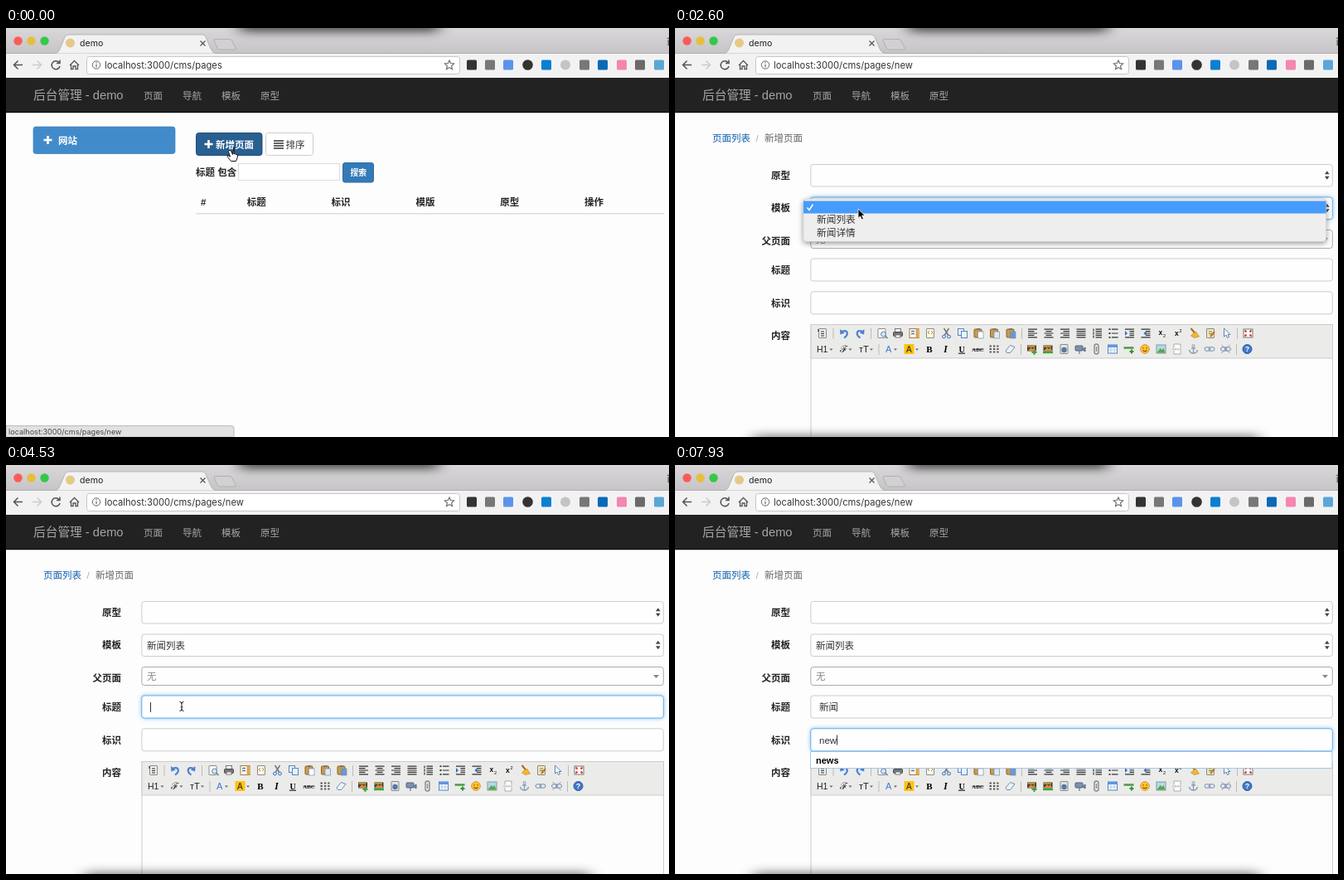
Recreate the animation shown at these times as an HTML page. Size 800 px wide and 493 px high, loop 8 s.

```html
<!DOCTYPE html>
<html lang="zh-CN">
<head>
<meta charset="utf-8">
<title>demo</title>
<style>
html, body { margin: 0; width: 100%; height: 100%; overflow: hidden; background: #fdfdfe; }
svg { display: block; width: 100vw; height: 100vh; }
text { font-family: "Liberation Sans", "Noto Sans CJK SC", "Noto Sans CJK", sans-serif; white-space: pre; }
.ui { font-family: Inter, "Noto Sans CJK SC", sans-serif; }
.bold { font-weight: 700; }
.serif { font-family: "Liberation Serif", serif; }
</style>
</head>
<body>
<svg id="stage" viewBox="0 0 800 493" xmlns="http://www.w3.org/2000/svg"></svg>
<script>
const LOOP = 8000;

// Markup helpers; text is placed by its vertical centre.
const text = (x, cy, str, size = 11.5, fill = '#333', attrs = '') =>
  `<text x="${x}" y="${cy + size * .37}" font-size="${size}" fill="${fill}" ${attrs}>${str}</text>`;
const bold = (x, cy, str, size = 11.5, fill = '#222', attrs = '') =>
  text(x, cy, str, size, fill, `class="bold" ${attrs}`);
const rect = (x, y, w, h, fill, stroke = 'none', r = 0, attrs = '') =>
  `<rect x="${x}" y="${y}" width="${w}" height="${h}" rx="${r}" fill="${fill}" stroke="${stroke}" ${attrs}/>`;
const dot = (x, y, r, fill, stroke = 'none') =>
  `<circle cx="${x}" cy="${y}" r="${r}" fill="${fill}" stroke="${stroke}"/>`;
const path = (d, fill = 'none', stroke = 'none', w = 1, attrs = '') =>
  `<path d="${d}" fill="${fill}" stroke="${stroke}" stroke-width="${w}" ${attrs}/>`;
const group = (id, body, attrs = '') => `<g id="${id}" ${attrs}>${body}</g>`;
const at = (x, y, body) => `<g transform="translate(${x} ${y})">${body}</g>`;
const plus = (x, y) => path(`M${x - 5} ${y}h10M${x} ${y - 5}v10`, 'none', '#fff', 2.6);

const defs = `<defs>
  <linearGradient id="strip" x2="0" y2="1"><stop stop-color="#d9d7d9"/><stop offset="1" stop-color="#c6c4c6"/></linearGradient>
  <linearGradient id="pop" x2="0" y2="1"><stop stop-color="#f3f3f3"/><stop offset="1" stop-color="#cacaca"/></linearGradient>
  <filter id="blur" x="-20%" y="-200%" width="140%" height="500%"><feGaussianBlur stdDeviation="9 6"/></filter>
  <filter id="soft" x="-5%" y="-30%" width="110%" height="170%"><feDropShadow dx="0" dy="2" stdDeviation="3" flood-opacity=".4"/></filter>
  <filter id="glow" x="-5%" y="-40%" width="110%" height="180%"><feDropShadow dx="0" dy="0" stdDeviation="2.5" flood-color="#66afe9" flood-opacity=".75"/></filter>
</defs>`;

function browser() {
  const lights = ['#fc5b57', '#e5bf3c', '#34c84a'].map((c, i) => dot(14.5 + i * 16, 15.5, 5.2, c)).join('');
  const square = (x, c) => rect(x - 6, 38.5, 12, 12, c, 'none', 1.5);
  const extensions = square(562, '#333') + square(584, '#777') + square(606, '#5b93ea') + dot(629.5, 44.5, 6.3, '#333') +
    square(652, '#0a7fd0') + dot(675, 44.5, 6, '#c4c4c4') + square(698, '#777') +
    group('idle', dot(720, 44.5, 5, '#d6d6d6')) + group('ready', square(720, '#0b69b5')) +
    square(743, '#f486b0') + square(765, '#6a6a6a') + square(788, '#5aa7d6');
  return rect(0, 0, 800, 31, 'url(#strip)') +
    rect(282, -10, 240, 14, '#000', 'none', 0, 'filter="url(#blur)" opacity=".72"') +
    path('M0 30.5H800', 'none', '#b0aeb0') +
    path('M58 31C64 30 64 27 66 23L71 11Q72 8 76 8H237Q240 8 241 11L247 25Q249 30 254 31Z', '#f3f2f3', '#aaa', .8) +
    path('M251 15Q251 13.5 253 13.5H270Q272 13.5 273 16L277 24Q278 26 276 26H259Q256 26 255 24Z', '#d2d0d2', '#aaa', .8) +
    lights + dot(77.5, 18, 5.5, '#e5c988') + text(89, 18.5, 'demo', 10.6, '#222', 'class="ui"') +
    path('M234.5 15.5l6 6m0-6l-6 6', 'none', '#555', 1.2) + text(797, 16, '首', 10, '#333') +
    rect(0, 31, 800, 29, '#f3f2f3') +
    path('M20 44.5H10M14.5 39.5l-5 5 5 5', 'none', '#555', 1.5) +
    path('M32 44.5H42M37.5 39.5l5 5-5 5', 'none', '#ccc', 1.5) +
    path('M64 41.5A5 5 0 1 0 65 46M65 38.5V42.5H61', 'none', '#555', 1.5) +
    path('M77 45L82.5 39.5 88 45M78.5 44V49.5H81V46H84V49.5H86.5V44', 'none', '#555', 1.3) +
    rect(97.5, 34.5, 450, 21, '#fff', '#c8c7c8', 3) +
    dot(109, 44.5, 4.7, 'none', '#666') + path('M109 43.7V47.2M109 41.3V42.5', 'none', '#666', 1.2) +
    `<text id="url" class="ui" x="119" y="48.6" font-size="11.2" fill="#333"></text>` +
    path('M535 39l1.6 3.6 4 .4-3 2.7.9 3.9-3.5-2-3.5 2 .9-3.9-3-2.7 4-.4Z', 'none', '#666', 1.1) + extensions;
}

const navbar = rect(0, 60, 800, 42, '#222') + rect(0, 101, 800, 1.2, '#080808') +
  text(33, 81, '后台管理 - demo', 14.7, '#a6a6a6') +
  ['页面', '导航', '模板', '原型'].map((s, i) => text(166 + i * 47, 81.5, s, 11.5, '#a6a6a6')).join('');

const listPage = rect(33, 119, 171, 32.5, '#428bca', '#3b80bd', 3, 'stroke-width=".7"') + plus(50.5, 135) + bold(63, 135.5, '网站', 11.5, '#fff') +
  rect(229.5, 126.5, 79.5, 27, '#286090', '#204d74', 3) + plus(244.5, 140) + bold(253, 140.5, '新增页面', 11.5, '#fff') +
  rect(313.5, 126.5, 57, 27, '#fff', '#ccc', 3) + path('M323 136h12m-12 3h12m-12 3h12m-12 3h12', 'none', '#333', 1.7) + text(337.5, 140.5, '排序') +
  bold(229, 173.5, '标题 包含') + rect(280.5, 163.5, 122, 20, '#fff', '#ddd') +
  rect(406.5, 162.5, 37, 23.5, '#337ab7', '#2e6da4', 2.5) + bold(415.5, 174, '搜索', 9.8, '#fff') +
  ['#', '标题', '标识', '模版', '原型', '操作'].map((s, i) => bold(i ? 189 + i * 101.8 : 235, 209.5, s)).join('') +
  rect(229, 223, 565, 1.5, '#ddd') +
  group('status', path('M0 479.5H272Q275 479.5 275 482V493H0Z', '#e2e1e2', '#bbb') +
    text(3, 486.5, 'localhost:3000/cms/pages/new', 9.1, '#444', 'class="ui"'));

// Editor toolbar icons, drawn around their own centre.
const sheet = (c = '#fff') => rect(-4.5, -5.5, 9, 11, c, '#8a8a8a', .5);
const board = (c) => rect(-5.5, -5, 9, 10, '#c89a4c', '#8a6528', 1) + rect(-2.5, -6, 4, 2, '#777') + rect(-1, -2, 6.5, 8, c, '#7c8ca8', 0, 'stroke-width=".7"');
const rows = (starts) => path(starts.map((s, i) => `M${s[0]} ${i * 2.4 - 4.8}H${s[1]}`).join(''), 'none', '#333', 1.2);
const full = [-5.5, 5.5], mid = [-3.5, 3.5], left = [-5.5, 2], right = [-2, 5.5], item = [-2, 5.5];
const bend = (s) => path(`M${-s * 3}-2Q${s * 4}-5 ${s * 3.8} 1Q${s * 3} 4 0 5.5`, 'none', '#4a7fd2', 2.2) +
  path(`M${-s * 5}-5L${-s * 4.6} 1.5 ${s * .8}-.5Z`, '#4a7fd2');
const glyph = (s, size, fill = '#111', attrs = '') => text(0, 0, s, size, fill, `text-anchor="middle" ${attrs}`);
const shift = (s) => rows([full, [0, 5.5], [0, 5.5], [0, 5.5], full]) + path(`M${-2.5 - 3 * s} -3l${3 * s} 3 ${-3 * s} 3Z`, '#2f6fc4');
const picture = rect(-5.5, -4.5, 11, 7, '#3e3e30') + path('M-5 2L-1-2 1 0 3-2 5 2Z', '#e8843a') + path('M-5-3h9', 'none', '#e8c43a', 1.3);
const chain = rect(-6, -2.2, 7, 4.4, 'none', '#7189ac', 2.2) + rect(-1, -2.2, 7, 4.4, 'none', '#7189ac', 2.2);
const SEP = '|';

const topIcons = [
  sheet('#eee') + path('M-2-2h4m-4 2.5h4m-4 2.5h4M-5-5v3', 'none', '#333', 1.2), SEP,
  bend(1), bend(-1), SEP,
  sheet() + dot(2, 1, 3, '#d5e7f8', '#6481a8') + path('M4 3l3 3', 'none', '#6481a8', 1.6),
  rect(-3.5, -5.5, 7, 5, '#fff', '#777') + rect(-5.5, -1.5, 11, 5, '#777', '#444', 1) + rect(-3, 2, 6, 3, '#fff', '#777'),
  rect(-5.5, -5.5, 11, 11, '#fff', '#a77a34') + rect(2, -5.5, 3, 11, '#e5a43c') + path('M-3.5-2.5h4m-4 3h4', 'none', '#4b75aa', 1.5),
  sheet('#fffbe8') + path('M-1-3l-2 2 2 2m2-4 2 2-2 2', 'none', '#b78b31'),
  path('M-3-6L2 2M3-6L-2 2', 'none', '#777', 1.5) + dot(-3, 4, 1.9, 'none', '#2a6bc6') + dot(3, 4, 1.9, 'none', '#2a6bc6'),
  rect(-5.5, -5.5, 7, 8, '#e9f2fd', '#5a85bd') + rect(-1.5, -2.5, 7, 8, '#e9f2fd', '#5a85bd'),
  board('#fff'), board('#dfeaf7'), board('#6d97cf'), SEP,
  rows([full, left, full, left, full]), rows([full, mid, full, mid, full]), rows([full, right, full, right, full]), rows([full, full, full, full, full]),
  rows([item, item, item, item, item]) + path('M-4.5-5.5v3m0 1v3m0 1v3', 'none', '#333', 1.2),
  rows([item, [9, 9], item, [9, 9], item]) + path('M-5.5-4.8h2m-2 4.8h2m-2 4.8h2', 'none', '#333', 1.8),
  shift(1), shift(-1),
  text(-4, -1, 'x', 8.5, '#111', 'class="bold"') + text(1.5, 2.5, '2', 5.5, '#111'),
  text(-4, 0, 'x', 8.5, '#111', 'class="bold"') + text(1.5, -3, '2', 5.5, '#111'),
  path('M-4-6L1 0', 'none', '#a66c20', 2) + path('M-1 0L2-2 6 4 0 5.5-4 3Z', '#f2b62e', '#b9821d', .6),
  sheet('#f5e5b5') + path('M-2-2h4m-4 2.5h4', 'none', '#777') + path('M0 4L5-2', 'none', '#b67823', 2),
  path('M-3-6V4L-.5 2 1 5.5 3 4.5 1.5 1.5H4.5Z', '#fff', '#5983af', 1), SEP,
  rect(-5.5, -5, 11, 10, '#fff', '#777') + path('M-4-3.5l2 2m6-2-2 2m-6 5 2-2m6 2-2-2', 'none', '#d4322c', 2)
];

const bottomIcons = [
  glyph('B', 11, '#000', 'class="serif bold"'), glyph('I', 11.5, '#000', 'class="serif bold" font-style="italic"'),
  glyph('U', 10, '#000', 'class="serif bold"') + path('M-4 5.2H4', 'none', '#000'),
  glyph('ABC', 6.8, '#222', 'class="serif bold"') + path('M-7 .3H7', 'none', '#222', .8),
  path('M-5.5-3.5h11m-11 3.5h11m-11 3.5h11', 'none', '#555', 2, 'stroke-dasharray="2.4 2"'),
  path('M-5.5 2L0-4.5 5.5-2.5 0 4.5-4 4.5Z', '#edf3fb', '#738cae', 1), SEP,
  picture + path('M0 4h6M3 1v6', 'none', '#3da53b', 2), picture + path('M-6 4h12', 'none', '#3da53b', 2.5),
  sheet('#dfe5ec') + dot(0, 1, 3.2, '#58789c'),
  rect(-6, -4, 9, 6, '#7d91ab', '#4f6480', 1) + path('M3 0l3-2v5l-3-2M-1 2v4', '#7d91ab', '#4f6480', 1),
  rect(-2.5, -6, 5, 12, 'none', '#888', 2.5, 'stroke-width="1.4"') + path('M0-3V3', 'none', '#888', 1.4),
  rect(-5.5, -5, 11, 10, '#fff', '#4e83c4') + rect(-5.5, -5, 11, 3, '#5e98dd') + path('M-5.5 1h11M-2-2v7m4-7v7', 'none', '#9fc0e8', .8),
  path('M-6-1.5H6', 'none', '#4c9a45', 2.5) + path('M1 3h5m-2.5-2.5v5', 'none', '#319a35', 2),
  dot(0, 0, 5.3, '#ffc531', '#d9952a') + path('M-2.5 1.5Q0 4 2.5 1.5M-2-2v1.5M2-2v1.5', 'none', '#7c4a0d', 1.1),
  rect(-5.5, -5, 11, 10, '#b3d8f4', '#8a9a94') + path('M-5 4.5L-1-1 1 1 3-1 5 4.5Z', '#57a747'),
  path('M-4-1.5V-6H4V-1.5M-4 2V6H4V2', '#fff', '#aaa') + path('M-6 .2H6', 'none', '#aaa', 1, 'stroke-dasharray="2 1"'),
  dot(0, -4, 1.5, 'none', '#8a9bb3') + path('M0-2.5V5M-5 1Q-4 5 0 5 4 5 5 1M-2.5-1h5', 'none', '#8a9bb3', 1.3),
  chain, chain + path('M-5-5L5 5M5-5L-5 5', 'none', '#8b9cb3', 1), SEP,
  dot(0, 0, 5.5, '#3f78cb', '#2e5ca2') + glyph('?', 9, '#fff', 'class="bold"')
];

function iconRow(icons, x, y) {
  return icons.map(icon => {
    if (icon === SEP) {
      const line = path(`M${x - 6.5} ${y - 6}v13`, 'none', '#bbb');
      x += 6.5;
      return line;
    }
    const drawn = at(x, y, icon);
    x += 19.5;
    return drawn;
  }).join('');
}

const caretDown = (x) => path(`M${x - 2} 386.5h4l-2 2.2Z`, '#666');
const editor = rect(164, 357.5, 629.5, 140, '#fdfdfe', '#ccc') + rect(164, 357.5, 629.5, 40.5, '#ebebea', '#ccc') +
  iconRow(topIcons, 178, 368) + iconRow(bottomIcons, 307, 387) +
  text(171, 387, 'H1', 10.5, '#222') + text(199, 387, 'ℱ', 11.5, '#222') + text(222, 387, 'тT', 11, '#222') +
  path('M246 381v13', 'none', '#bbb') + text(254, 387, 'A', 11, '#3a7bd0') + rect(276.5, 381, 12, 12, '#ffc20e') + text(279, 387, 'A', 10, '#222') +
  [188.5, 211.5, 237, 266, 292].map(caretDown).join('');

const field = (id, y, h, stroke = '#ccc') => rect(163.8, y, 629.5, h, '#fefeff', stroke, 3, `id="${id}"`);
const spinner = (y) => path(`M784 ${y - 1.2}h5.6l-2.8-4Zm0 2.4h5.6l-2.8 4Z`, '#444');
const formPage = text(45, 133, '页面列表', 11.5, '#1260ae') + text(97.5, 133, '/', 11.5, '#aaa') + text(108, 133, '新增页面', 11.5, '#666') +
  [['原型', 177.5], ['模板', 217], ['父页面', 257], ['标题', 292], ['标识', 331.5], ['内容', 371]]
    .map(([s, y]) => bold(139, y, s, 11.5, '#222', 'text-anchor="end"')).join('') +
  editor + field('proto', 164.5, 26.5) + spinner(177.5) +
  field('template', 204, 26.5) + spinner(217) + group('chosen', text(170, 217.5, '新闻列表')) +
  field('parent', 243.5, 22, '#aaa') + text(170, 255, '无', 11.5, '#888') + path('M781 253h7l-3.5 4Z', '#888') +
  field('title', 278, 27) + field('slug', 317.8, 27) +
  rect(95, 491, 610, 14, '#000', 'none', 0, 'filter="url(#blur)" opacity=".5"');

const typed = (id, cy) => `<text id="${id}" x="174" y="${cy + 4.2}" font-size="11.5" fill="#333"></text>`;
const suggestion = (id, y, word) => group(id, rect(163.5, y, 629.5, 20, '#fff', '#9fc9ee') + bold(170, y + 10.5, word, 11, '#000'));
const menuItem = (id, y, s) => `<g id="${id}">${text(171, y, s, 11.7, 'currentColor')}</g>`;
const overlays = suggestion('hintTitle', 305.8, '新闻') + suggestion('hintSlug', 345.5, 'news') +
  typed('titleText', 292) + typed('slugText', 331.5) +
  path('M174 298H200', 'none', '#333', 1.1, 'id="underline"') + path('M0 0v12', 'none', '#333', 1, 'id="caret"') +
  group('ime', rect(164, 301, 371, 28, 'url(#pop)', '#ccc', 4, 'id="imeBox" stroke-width=".5" filter="url(#soft)"') + '<g id="words"></g>') +
  group('menu', rect(154.8, 206, 631, 51.5, '#efeeef', '#bbb', 4, 'stroke-width=".6" filter="url(#soft)"') +
    rect(155, 208.5, 630.6, 15, '#469bfc', 'none', 0, 'id="highlight"') +
    path('M159.5 216.5l2.5 3 4.5-7', 'none', 'currentColor', 1.6, 'id="tick"') + menuItem('first', 231, '新闻列表') + menuItem('second', 246.5, '新闻详情'));

const cursors = group('pointer',
  group('ring', dot(0, 0, 13.3, '#fff', '#111'), 'stroke-width="1.3"') +
  group('hand', path('M-1 3.5Q1 2.5 2 5L3.5 8.5 5-.5V8Q7 6.5 7.5 8.5 9.5 8 9.5 10L9 13 7.5 16.5H1.5L-2.5 11.5Q-4 9-2 9.5L.5 11-1.5 5.5Q-2 4-1 3.5Z', '#fff', '#111', 1)) +
  group('arrow', path('M0 0V11.2L2.6 8.9 4.4 13 6.4 12.1 4.6 8.1H8.2Z', '#000', '#fff', .8)) +
  group('beam', path('M-2.5-5.5Q0-5.5 0-3.5Q0-5.5 2.5-5.5M0-4V4M-2.5 5.5Q0 5.5 0 3.5Q0 5.5 2.5 5.5M-1.3.8h2.6', 'none', '#222', 1)));

const stage = document.getElementById('stage');
stage.innerHTML = defs + rect(0, 0, 800, 493, '#fdfdfe') + group('list', listPage) + group('form', formPage + overlays) + navbar + browser() + cursors;
const $ = (id) => document.getElementById(id);
const show = (id, on) => $(id).setAttribute('display', on ? 'inline' : 'none');
const within = (t, a, b) => t >= a && t < b;

const titleKeys = [[0, ''], [4600, 'x'], [4750, 'xi'], [4900, 'xin'], [5200, "xin'w"], [5430, "xin'we"], [5570, "xin'wen"], [5750, '新闻']];
const slugKeys = [[0, ''], [7330, 'n'], [7600, 'ne'], [7870, 'new']];
const candidates = [[4600, '想 下 小 向 新 先 学'], [4900, '新 心 信 欣 鑫 辛 薪'], [5200, '新闻 欣慰 新文 新伟 新汶 新围 昕薇']];
const route = [[0, 270, 144], [1400, 270, 144], [1950, 221, 218], [2650, 221, 218], [3050, 215, 231], [3420, 214, 232],
  [3650, 212, 283], [4000, 212, 291], [5950, 212, 291], [6350, 206, 332], [LOOP, 206, 332]];
const last = (steps, t) => steps.filter(s => s[0] <= t).pop() || [0, ''];

function position(t) {
  const i = Math.max(1, route.findIndex(p => p[0] > t));
  const [t0, x0, y0] = route[i - 1], [t1, x1, y1] = route[i];
  const u = (t - t0) / (t1 - t0), e = u * u * (3 - 2 * u);
  return [x0 + (x1 - x0) * e, y0 + (y1 - y0) * e];
}

let shownWords = null;
function drawCandidates(words) {
  if (words === shownWords) return;
  shownWords = words;
  let x = 177;
  const items = words.split(' ').map((w, i) => {
    const item = text(x, 315.5, `${i + 1}.${w}`, 13, i ? '#555' : '#1b98ea');
    x += 21.7 + 13 * w.length;
    return item;
  }).join('');
  $('words').innerHTML = items + path(`M${x + 4} 314l-3 3 3 3`, 'none', '#999', 1.4) + path(`M${x + 10} 314l3 3-3 3`, 'none', '#1b98ea', 1.8);
  $('imeBox').setAttribute('width', x + 22 - 164);
}

function render(t) {
  const onForm = t >= 930;
  show('list', !onForm);
  show('form', onForm);
  show('status', t < 800);
  $('url').textContent = 'localhost:3000/cms/pages' + (onForm ? '/new' : '');
  const sniffing = within(t, 930, 1450);
  show('idle', sniffing);
  show('ready', !sniffing);

  const focus = t < 2050 ? '' : t < 4250 ? 'template' : t < 6530 ? 'title' : 'slug';
  for (const id of ['template', 'title', 'slug']) {
    $(id).setAttribute('stroke', id === focus ? '#66afe9' : '#ccc');
    $(id).setAttribute('filter', id === focus ? 'url(#glow)' : 'none');
  }
  show('chosen', t >= 3740);

  const [x, y] = position(t);
  const onFirst = y > 224;
  show('menu', within(t, 2050, 3450));
  $('highlight').setAttribute('y', onFirst ? 223.5 : 208.5);
  $('tick').setAttribute('color', onFirst ? '#333' : '#fff');
  $('first').setAttribute('color', onFirst ? '#fff' : '#333');
  $('second').setAttribute('color', '#333');

  const title = last(titleKeys, t), slug = last(slugKeys, t);
  $('titleText').textContent = title[1];
  $('slugText').textContent = slug[1];
  const composing = within(t, 4600, 5750);
  show('ime', composing);
  if (composing) drawCandidates(last(candidates, t)[1]);
  show('hintTitle', within(t, 5750, 6530));
  show('hintSlug', t >= 7330);

  const inTitle = focus === 'title', inSlug = focus === 'slug';
  const since = t - Math.max(inTitle ? title[0] : slug[0], inTitle ? 4250 : 6530);
  show('caret', (inTitle || inSlug) && since % 1000 < 500);
  const end = 174.5 + (onForm ? $(inTitle ? 'titleText' : 'slugText').getComputedTextLength() : 0);
  $('caret').setAttribute('transform', `translate(${end} ${inTitle ? 286 : 325.5})`);
  show('underline', composing);
  $('underline').setAttribute('d', `M174 297.5H${end}`);

  show('pointer', !within(t, 4600, 5950) && t < 7330);
  $('pointer').setAttribute('transform', `translate(${x} ${y})`);
  show('hand', t < 980);
  show('arrow', within(t, 980, 3720));
  show('beam', t >= 3720);
  show('ring', within(t, 4180, 4380) || within(t, 6400, 6600));
}

const start = performance.now();
function tick() {
  render((performance.now() - start) % LOOP);
  requestAnimationFrame(tick);
}
tick();
</script>
</body>
</html>
```
